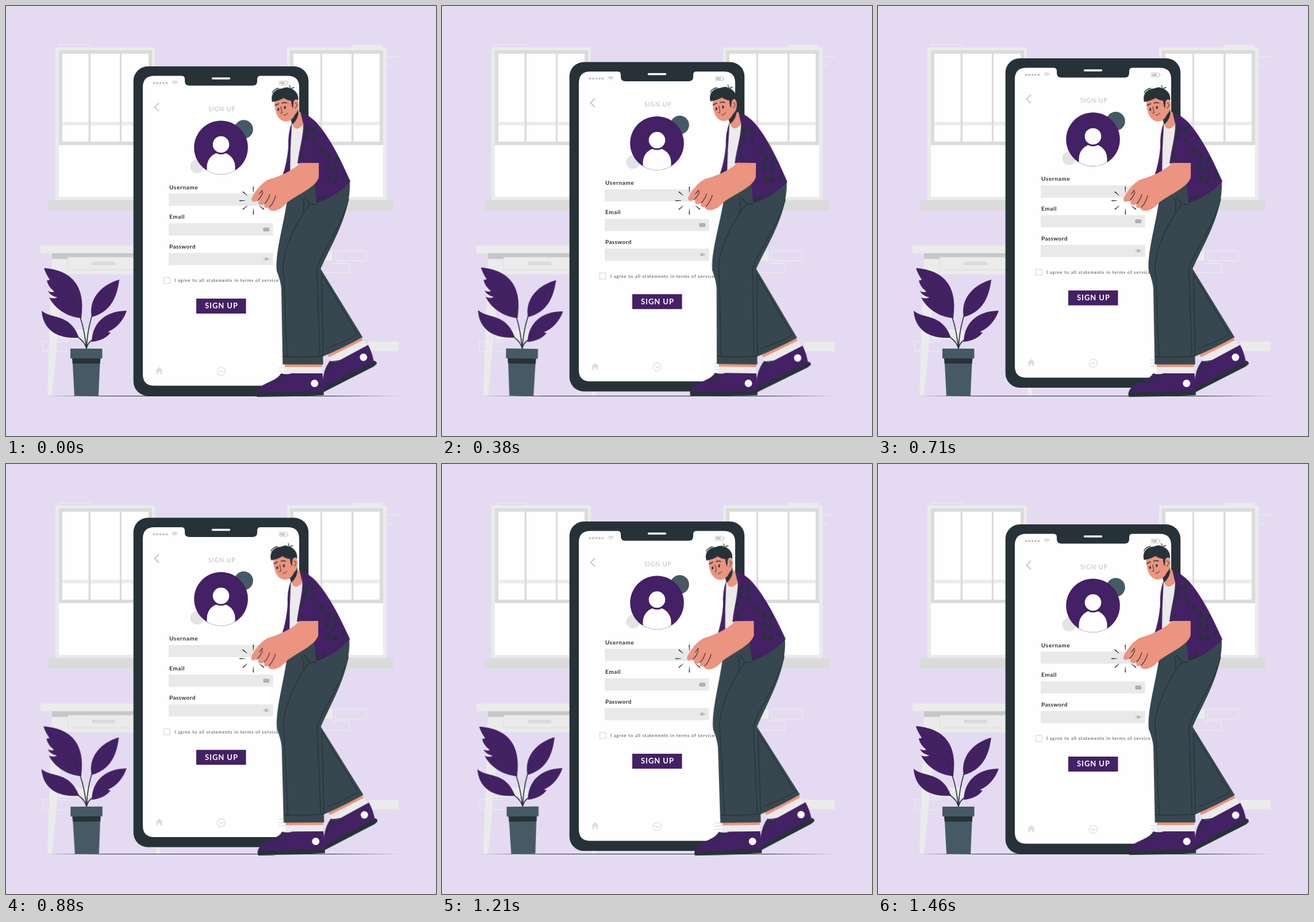
An HTML page without scripts for the animation above (1500 ms loop, 748 by 748 pixels).

```html
<!DOCTYPE html>
<html lang="en">
<head>
<meta charset="utf-8">
<title>Sign up</title>
<style>
  html, body { margin: 0; width: 100%; height: 100%; overflow: hidden; background: #e4dbf2; }
  svg { display: block; width: 100%; height: 100%; font-family: Lato, sans-serif; }

  .phone, .person, .plant { animation: 1.5s linear -20ms infinite; }
  .phone { animation-name: float; }
  .person { animation-name: sway; transform-origin: 540px 409px; }
  .plant { animation-name: sway; transform-origin: 136px 567px; }
  @keyframes float { 50% { transform: translateY(-15px); } }
  @keyframes sway {
    25% { transform: rotate(1deg); }
    75% { transform: rotate(-1deg); }
  }

  .pale { fill: #ebebeb; }
  .mid { fill: #dbdbdb; }
  .white { fill: #fefefe; }
  .purple { fill: #442065; }
  .dark { fill: #263238; }
  .slate { fill: #455a64; }
  .trousers { fill: #37474f; }
  .skin { fill: #eb947f; }
  .line { fill: none; stroke: #263238; stroke-linecap: round; stroke-linejoin: round; }
  .outline { fill: none; stroke: #ebebeb; stroke-width: 1.3; }
  .icon { fill: none; stroke: #c4c4c4; stroke-linecap: round; stroke-linejoin: round; }
  .label { font-size: 10px; font-weight: 700; fill: #263238; }
</style>
</head>
<body>
<svg viewBox="0 0 748 748">
  <defs>
    <g id="window">
      <path class="pale" d="M86 72H259V338H86Z"/>
      <path class="mid" d="M92 77H254V242H92Z"/>
      <path class="white" d="M98 83H248V236H98ZM92 242H254V332H92Z"/>
      <path class="pale" d="M98 201.500H248V207.500H98Z"/>
      <path class="mid" d="M143.500 83h3.500V236h-3.500ZM198 83h3V236h-3Z"/>
      <path class="mid" d="M74 337.500H270V356H74Z"/>
    </g>
    <path id="spot" class="dark" d="M-3 5C-5 0 0 -7 3 -6C6 -4 3 6 -1 7Z"/>
    <path id="ray" class="dark" d="M-.9 -23L0 -25L.8 -23L.3 -14H-.3Z"/>
    <clipPath id="avatar"><circle cx="374" cy="246.700" r="46.500"/></clipPath>
  </defs>

  <!-- room -->
  <use href="#window"/>
  <use href="#window" transform="matrix(-1 0 0 1 748 0)"/>
  <path class="outline" d="M94 72V67.500H147V72M663 88H684M663 104H671M574 426.500H627V443H574ZM597 447.500H566M550 463.500H597V448M108 601H64.500V584H108"/>
  <path class="pale" d="M602 67.500H655V72H602ZM540 426H568V443H540ZM631 584H683.500V600.500H631ZM92 563H150V580H92Z"/>
  <path class="pale" d="M80 430H104L80 678H72ZM236 430H258L268 678H261Z"/>
  <path class="pale" d="M60 416.500H278V430H60ZM80 430H258V466.500H80Z"/>
  <path fill="#c7c7c7" d="M80 430H258V440H80Z"/>
  <path class="pale" stroke="#dbdbdb" d="M107.500 437H230V459H107.500Z"/>
  <path class="mid" d="M149 445H190V451H149Z"/>
  <path class="dark" d="M65 678.500L180 677.900H570L684 678.500L570 679.100H180Z"/>

  <g class="phone">
    <rect class="dark" x="221.700" y="105.500" width="304.500" height="573" rx="25"/>
    <path class="white" d="M258 122H306Q311 122 311 128V131Q311 139 319 139H429Q437 139 437 131V128Q437 122 442 122H490Q510 122 510 142V641Q510 661 490 661H258Q238 661 238 641V142Q238 122 258 122Z"/>
    <path stroke="#fefefe" stroke-width="3.500" stroke-linecap="round" d="M359.500 126.500H388.500"/>
    <path class="icon" stroke-width="4" stroke-dasharray="0 5.500" d="M257.500 134.300H280"/>
    <path class="icon" stroke-width="1.300" d="M289 133Q293.500 129 298 133M291 135Q293.500 132.500 296 135M293.500 137V137.200"/>
    <rect class="icon" x="475.500" y="131" width="13.500" height="7" rx="1"/>
    <path fill="#c4c4c4" d="M477 132.500H485V136.500H477ZM490 133H491.200V136H490Z"/>
    <path class="icon" stroke-width="1.900" d="M265.500 169.500L258.500 176.500L265.500 183"/>
    <text x="352" y="183" font-size="10.500" letter-spacing=".9" fill="#bdbdbd">SIGN UP</text>

    <circle class="slate" cx="413.500" cy="215" r="16.300"/>
    <circle cx="332.500" cy="279.500" r="12" fill="#e4e4e4"/>
    <circle class="purple" cx="374" cy="246.700" r="46.800"/>
    <g clip-path="url(#avatar)" class="white">
      <path d="M349.500 295V280A24.500 25 0 0 1 398.500 280V295Z"/>
      <circle cx="374" cy="241.300" r="15.800" stroke="#442065" stroke-width="3"/>
    </g>

    <path fill="#e9e9e9" d="M283 326.700H464.500V348H283ZM283 378.300H464.500V399.600H283ZM283 430H464.500V451.200H283Z"/>
    <g class="label">
      <text x="284" y="319" letter-spacing=".65">Username</text>
      <text x="284" y="370.500" letter-spacing=".6">Email</text>
      <text x="284" y="422.200" letter-spacing=".35">Password</text>
    </g>
    <rect x="447.500" y="385.800" width="10.500" height="6.500" rx="1" fill="#aaa"/>
    <path d="M448 386.500L452.700 389.500L457.500 386.500" fill="none" stroke="#c8c8c8" stroke-width=".8"/>
    <path d="M448 440.500Q452.700 436 457.500 440.500Q452.700 445 448 440.500Z" fill="none" stroke="#aaa"/>
    <circle cx="452.700" cy="440.500" r="1.800" fill="#aaa"/>
    <rect x="274.500" y="472.500" width="10.500" height="10.500" fill="none" stroke="#dedede" stroke-width="1.500"/>
    <text x="293" y="480.800" font-size="8" letter-spacing=".7" fill="#455057">I agree to all statements in terms of service</text>
    <path class="purple" d="M331 509.300H417.500V535.300H331Z"/>
    <text class="white" x="346" y="526.600" font-size="13" font-weight="700" letter-spacing=".95">SIGN UP</text>

    <path fill="#dedede" d="M266.500 628.500L273 634.500H271.500V641H268.500V637H264.500V641H261.500V634.500H260Z"/>
    <circle cx="374.300" cy="636" r="7" fill="none" stroke="#dedede" stroke-width="1.300"/>
    <path fill="none" stroke="#dedede" stroke-width="1.500" d="M371 634.500L374.300 637.500L377.600 634.500M474 630H488M474 635.500H488M474 641H488"/>
  </g>

  <g class="plant">
    <g class="purple">
      <path d="M66 456C109 459 140 482 131 543C105 541 84 525 75 507Q83 510 89 507Q77 504 73 496Q79 499 84 497Q72 487 71 477Q74 478 76 476Q69 466 66 456Z"/>
      <path d="M197 476C165 485 143 510 149 541C182 532 193 507 197 476Z"/>
      <path d="M62 530C78 545 112 534 127 577C88 580 64 562 62 530Z"/>
      <path d="M210 530C181 530 151 544 149 584C164 583 175 577 182 568L177 567C193 560 204 547 210 530Z"/>
    </g>
    <g class="line">
      <path stroke-width="1.600" d="M129 541Q137 566 140 596M149 540Q141 568 140 596M125 576Q137 584 140 596M150 581Q142 586 140 596"/>
      <path stroke-width=".9" d="M73 465C96 482 120 512 130 541M192 482Q158 510 149 540M66 538Q84 566 126 576M204 534Q166 551 150 581"/>
      <path stroke-width=".6" d="M90 480L110 482M103 495L124 501M114 511L131 521M102 494L87 491M113 510L90 514M122 525L101 530M178 495V508M165 508L181 521M155 523L169 532M78 553L91 545M92 564L109 554M182 545L195 552M167 556L176 566M157 569L168 577"/>
    </g>
    <path class="slate" d="M116 621H163.500L161 678H119Z"/>
    <path class="dark" d="M115 612H164.500L163.800 622H115.700Z"/>
    <path class="slate" d="M112 596H167.500V613H112Z"/>
  </g>

  <g class="person">
    <!-- rear foot -->
    <path class="skin" d="M559 606L618 576L622 582L563 612Z"/>
    <path class="pale" d="M561 611.500L621.500 581L630 592L579 621L566 619Z"/>
    <path class="purple" d="M551 668C550 650 553 630 564 617Q570 621 578 617.500L630 589.500Q637 602 640 618Z"/>
    <path class="dark" d="M551 665L641 617Q646 619 644.500 623L640 627L551 672.500Z"/>
    <circle class="white" cx="622" cy="611" r="6.400"/>
    <path class="line" stroke-width="1.600" d="M564 619L580 617M560 625L577 621M557 631L572 627M555 638L566 633"/>

    <!-- trousers -->
    <path class="trousers" d="M543 450L620.500 576Q588 594 553 609L546 600Z"/>
    <path class="skin" d="M485 622H550V629H485Z"/>
    <path class="pale" d="M485 628H550V641H485Z"/>
    <path class="trousers" d="M489 338C482 385 468 430 471 461Q478 479 479 492L481.500 623.500H552L547 458C567 412 600 362 598 306L540 295Z"/>
    <path class="line" stroke-width="1.300" d="M527 346C503 379 477 432 483 468L489 611M596 336C582 390 547 428 541 459L546 607M549 466L552 609M551 470Q588 530 610 569M557 596Q586 586 614 570M482 610Q516 612 551 609M515 334Q521 346 516 358M519 332L529 345H540"/>

    <!-- front foot -->
    <path class="purple" d="M436 673C440 655 468 656 479 639Q488 642 497 639H550.500Q553 656 552.500 672Z"/>
    <path class="dark" d="M436 672.500Q495 671 553 670.500V677Q495 680 437 680Q435 677 436 672.500Z"/>
    <circle class="white" cx="537" cy="656.500" r="6.500"/>
    <path class="line" stroke-width="1.700" d="M478 641L495 643M475 645L491 648M470 649L486 653M464 653L478 657"/>

    <!-- torso -->
    <path class="purple" d="M497 203Q490 220 491 245Q489 272 480 298L499 293L505 215Z"/>
    <path class="pale" d="M497 205Q494 250 494 294L515 285L520 206L515 202Z"/>
    <path class="skin" d="M496 194L512 184L517 206Q509 215 504 213Q498 211 498 202Z"/>
    <path class="purple" d="M515 188Q523 188 531 195C553 211 578 257 599 305Q573 333 540 343L537 310L541 274H507C510 248 517 228 517 206Z"/>
    <path class="line" stroke-width=".9" d="M537 222Q541 250 545 274"/>
    <g id="spots">
      <use href="#spot" transform="translate(522 214) rotate(15)"/>
      <use href="#spot" transform="translate(534 215) rotate(10)"/>
      <use href="#spot" transform="translate(521 228)"/>
      <use href="#spot" transform="translate(535 232) rotate(20) scale(.8)"/>
      <use href="#spot" transform="translate(516 243) rotate(10) scale(.7)"/>
      <use href="#spot" transform="translate(515 263) scale(.7)"/>
      <use href="#spot" transform="translate(550 251) rotate(-35)"/>
      <use href="#spot" transform="translate(561 263) rotate(-8)"/>
      <use href="#spot" transform="translate(574 267) rotate(10)"/>
      <use href="#spot" transform="translate(559 281) rotate(-12)"/>
      <use href="#spot" transform="translate(571 284) rotate(10)"/>
      <use href="#spot" transform="translate(562 300) rotate(10)"/>
      <use href="#spot" transform="translate(573 302) rotate(20)"/>
      <use href="#spot" transform="translate(587 296) rotate(-15) scale(.8)"/>
      <use href="#spot" transform="translate(552 333) rotate(15) scale(.8)"/>
      <use href="#spot" transform="translate(543 336) scale(.7)"/>
    </g>

    <!-- arm and hand -->
    <path class="skin" d="M511 273C503 284 476 297 456 302Q444 309 437 319Q426 333 427 338Q430 344 437 338L440 337Q437 346 443 346Q447 347 450 344Q447 353 456 351Q458 358 469 356Q480 353 490 341C511 326 539 315 544 298V273Z"/>
    <path class="line" stroke-width="1.100" d="M447 324Q443 334 437 339M459 328Q456 338 450 344M469 330Q465 344 458 350"/>

    <!-- head -->
    <path class="dark" d="M495 198L508 178Q511 194 498 206Z"/>
    <path class="skin" d="M467 162C466 178 470 200 487 201Q497 201 503 188Q509 183 509 172Q509 162 503 164L498 152H474Z"/>
    <path class="dark" d="M463 167C459 153 468 144 480 143.500Q489 140 493 143C502 145 510 153 508 165Q504 160 500 166L499 178Q496 173 496 165Q488 164 483 160Q475 165 463 167Z"/>
    <path class="line" stroke-width="1.300" d="M494 147Q495 142 493 138M494 146Q497 142 501 142M463 151Q465 145 474 143"/>
    <path class="line" stroke-width="1.600" d="M468 173L474 170M480 169Q484 167 488 169"/>
    <g class="dark">
      <ellipse cx="473.500" cy="180" rx="1.600" ry="2.800"/>
      <ellipse cx="485" cy="176.500" rx="1.600" ry="2.800"/>
    </g>
    <path class="line" stroke-width="1" d="M478 175L480 186L477 187M483 190Q488 190 490 186M503 169Q506 168 506 173L503 178"/>
  </g>

  <g transform="translate(430.300 338.500)">
    <use href="#ray"/>
    <use href="#ray" transform="rotate(42)"/>
    <use href="#ray" transform="rotate(130)"/>
    <use href="#ray" transform="rotate(180)"/>
    <use href="#ray" transform="rotate(230)"/>
    <use href="#ray" transform="rotate(270)"/>
    <use href="#ray" transform="rotate(310)"/>
  </g>
</svg>
</body>
</html>
```
